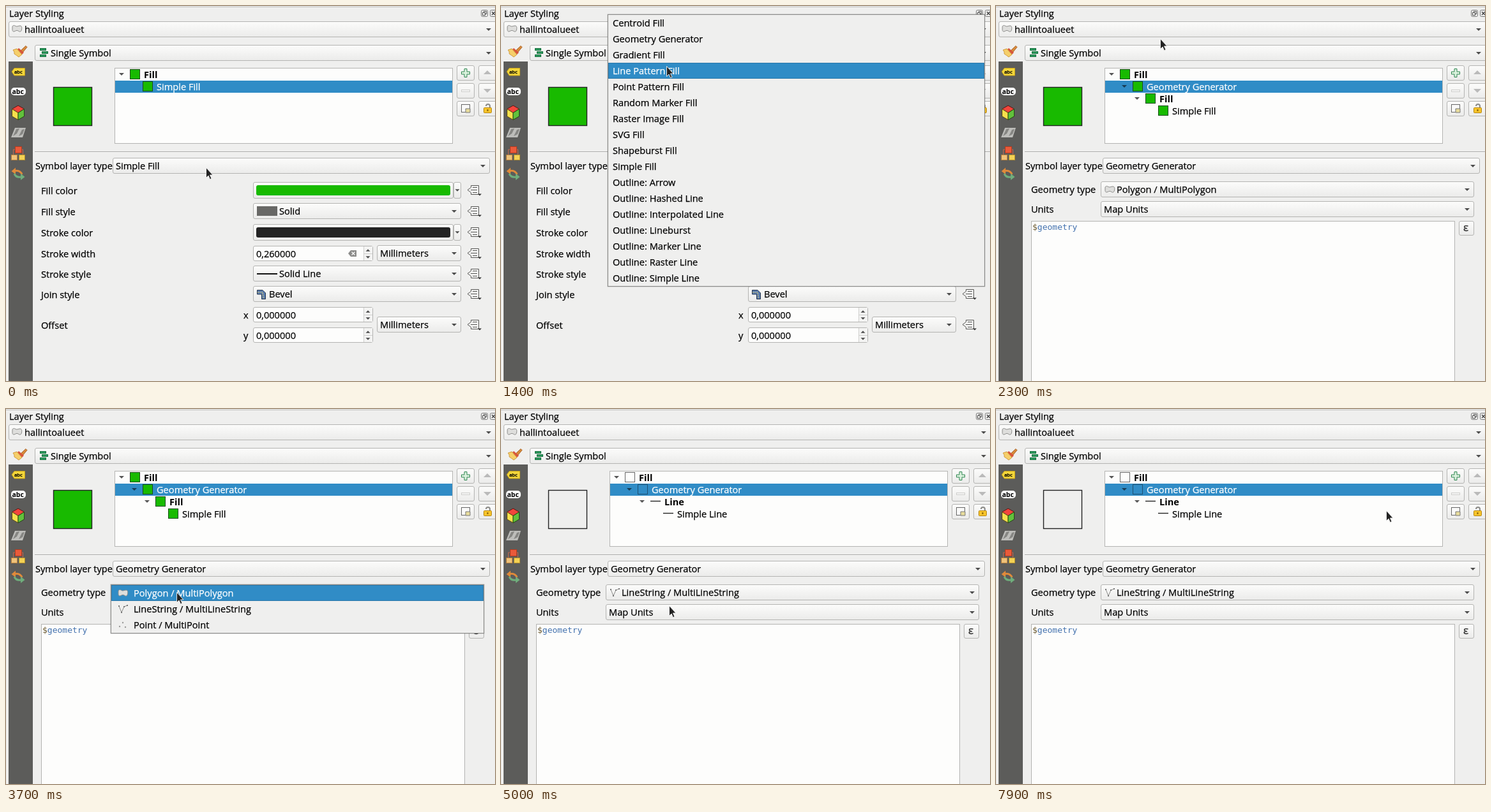
An HTML page that plays this animation: 766 px wide and 588 px high, repeating every 8 s.

```html
<!DOCTYPE html>
<html lang="en">
<head>
<meta charset="utf-8">
<title>Layer styling panel</title>
<style>
html, body { margin: 0; width: 100%; height: 100%; overflow: hidden; background: #efefee; }
svg { display: block; width: 100%; height: 100%; }
text { font: 14.6px "Open Sans", "Noto Sans", sans-serif; fill: #000; stroke: #000; stroke-width: .25px; }
.bold { font-weight: 700; stroke: none; }
.light { fill: #fff; stroke: #fff; }
.code { font: 13px "DejaVu Sans Mono", monospace; stroke: none; }
.tag { font-size: 7.5px; font-weight: 600; }
.label { font-size: 10.5px; font-weight: 700; stroke: none; }
.sign { font-size: 17px; fill: #333; }
</style>
</head>
<body>
<svg id="stage" viewBox="0 0 766 588" xmlns="http://www.w3.org/2000/svg"></svg>
<script>
const LOOP = 8000, STEP = 100;
const GREEN = '#18ba00', BLUE = '#308cc6', INK = '#232323', PAPER = '#fdfdfc', EDGE = '#b4b4b2';
const ROW = 25, TYPE_TOP = 14, GEOM_TOP = 276;

// Markup helpers
const group = (id, body) => `<g id="${id}">${body}</g>`;
const at = (x, y, body) => `<g transform="translate(${x} ${y})">${body}</g>`;
const text = (x, y, s, cls = '') => `<text x="${x}" y="${y}" class="${cls}">${s}</text>`;
const rect = (x, y, w, h, fill, stroke = 'none', r = 0, sw = 1) =>
  `<rect x="${x}" y="${y}" width="${w}" height="${h}" rx="${r}" fill="${fill}" stroke="${stroke}" stroke-width="${sw}"/>`;
const path = (d, fill = 'none', stroke = 'none', w = 1, dash = 'none') =>
  `<path d="${d}" fill="${fill}" stroke="${stroke}" stroke-width="${w}" stroke-dasharray="${dash}"/>`;
const box = (x1, y1, x2, y2, fill = 'url(#face)') =>
  rect(x1 + .5, y1 + .5, x2 - x1 - 1, y2 - y1 - 1, fill, EDGE, 2.5);
const down = (x, y, fill = '#4c4c4c', s = 4) => path(`M${x - s} ${y - s / 2}h${2 * s}l${-s} ${s}z`, fill);
const up = (x, y, fill = '#4c4c4c', s = 4) => path(`M${x - s} ${y + s / 2}h${2 * s}l${-s} ${-s}z`, fill);
const combo = (x1, y, x2, tx, label) =>
  box(x1, y, x2, y + 25) + down(Math.min(x2 - 11, 756), y + 13) + text(tx, y + 18, label);

const polygonIcon = (x, y) => at(x, y, path(
  'M1 3C1 0 4 0 6 1.5C8 3 10 1 13 1C16 1 16 4 15.5 7C15 10 13 11 11 9.5C9 8 7 8 5 9.5C2 11 1 9 1 7Z', '#dededc', '#8c8c8a'));
const lineIcon = (x, y) => at(x, y, path('M2 2L6 12L10 3L15 1', 'none', '#8a8a88') +
  [[2, 2], [6, 12], [10, 3], [15, 1]].map(([a, b]) => rect(a - 1, b - 1, 2, 2, '#777')).join(''));
const pointIcon = (x, y) => at(x, y,
  [[3, 10], [8, 4], [12, 11]].map(([a, b]) => `<circle cx="${a}" cy="${b}" r="1.2" fill="#9a9a98"/>`).join(''));

const override = y => at(722, y - 9,
  path('M6.500 1.500H18.500V15.500H6.500V12.500L1 8.500L6.500 4.500Z', '#f4f4f3', '#555553') +
  path('M9 4.500h7M6 8.500h10M9 12.500h7', 'none', '#555553') + down(20, 16, '#333', 3));

const colorRow = (y, fill) => box(387, y, 701, y + 26) + rect(392, y + 5, 304, 16, fill, 'none', 3) +
  box(701, y, 713, y + 26) + down(707, y + 13, '#4c4c4c', 3.5);
const spin = (y, value) => box(387, y, 575, y + 24, PAPER) + rect(560, y + 1, 14, 22, '#f4f4f3') +
  path(`M560.5 ${y + 1}v22M561 ${y + 12.5}h13`, 'none', '#cfcfcd') +
  up(567, y + 7, '#4c4c4c', 3.5) + down(567, y + 18, '#4c4c4c', 3.5) + text(392, y + 18, value);

function sideTabs() {
  const brush = path('M23 70L31 62.500L33 64.500L26 73Z', '#d98b3a', '#a8642a') +
    path('M20 66L28 73L25 76L17 69Z', '#d8553c') +
    path('M11 69L17 67L25 76L20 80Q16 77 13 75Q14 72 11 69Z', '#f6cf6a', '#cf9a3c');
  const labels = path('M9 103l4-5.500h16.500v11.500h-16.500z', '#f4d63a', '#c9a51c') + text(13, 106, 'abc', 'tag') +
    rect(8, 128, 23, 12, '#fafafa', 'none', 5) + text(9.5, 138, 'abc', 'label');
  const cube = path('M9.500 161.500L19 156L28.500 161.500L19 167.500Z', '#f2453c', '#5a1612') +
    path('M9.500 161.500L19 167.500V178.500L9.500 173Z', '#f8e04c', '#5a4e16') +
    path('M28.500 161.500L19 167.500V178.500L28.500 173Z', '#62c13c', '#234a14');
  const relief = path('M14 191H31L26 206H8Z', '#bdbdba') +
    path('M16 193L21 192L17 200L11 204ZM25 194L29 193L26 201L20 204Z', '#868683');
  const diagram = path('M11.500 233V225H26.500V233', 'none', '#c4674e') +
    rect(14.5, 220.5, 10, 10, '#ea5a3a', '#b33b20') +
    rect(8.5, 233.5, 9, 8, '#eec27a', '#b7813e') + rect(20.5, 233.5, 9, 8, '#f4d254', '#b08e2e');
  const history = path('M25 264Q22 257 14 258.500', 'none', '#e08a3a', 3) + path('M8.500 259L15 253.500V264Z', '#e08a3a') +
    path('M13 263Q16 269.500 23 268', 'none', '#6fae7c', 3) + path('M29.500 268L23 262.500V273Z', '#6fae7c');
  return rect(4, 87, 38, 510, '#5c5c5a') + brush + labels + cube + relief + diagram + history;
}

function toolButtons() {
  const faces = [93, 121, 149].map(y => box(706, y, 734, y + 24) + box(740, y, 775, y + 24)).join('');
  const plus = path('M718 98.500h4v4.500h4.500v4h-4.500v4.500h-4v-4.500h-4.500v-4h4.500z', '#d9f0dc', '#2f8650');
  const minus = rect(713.5, 131.5, 13, 3, '#f4f4f3', '#cfcfcd');
  const copy = rect(713.5, 154.5, 13, 12, '#fafaf9', '#666') + path('M720 167v-6h7v6z', '#e8dd9c', '#777');
  const lock = path('M758 160v-3a3 3 0 0 0 -6 0', 'none', '#8b8b88', 2) +
    rect(748.5, 159.5, 12, 8, '#f7c52b', '#b48310', 1) + rect(753.5, 162, 2, 3, '#8b6408');
  return faces + plus + minus + copy + lock + up(754, 104, '#bababa', 6) + down(754, 133, '#bababa', 6);
}

function frameWork() {
  const header = path('M0 1.5H766', 'none', '#c2c2c0') + text(5, 17, 'Layer Styling') +
    rect(744.5, 6.5, 10, 10, '#efefee', '#777', 2) + rect(748.5, 8.5, 4, 4, 'none', '#555') +
    rect(746.5, 10.5, 4, 4, '#efefee', '#555') +
    rect(758.5, 6.5, 10, 10, '#efefee', '#777', 2) + path('M761 9l5 5M766 9l-5 5', 'none', '#444', 1.5);
  const bars = [[53, 66], [56, 71], [53, 76]]
    .map(([x, y]) => rect(x + .5, y + .5, 9, 3, '#2f9c60', '#19703f')).join('');
  return header + combo(4, 24, 772, 29, 'hallintoalueet') + polygonIcon(9, 30) +
    sideTabs() + combo(45, 61, 772, 70, 'Single Symbol') + bars +
    rect(170.5, 97.5, 529, 118, PAPER, EDGE) + rect(171, 117, 528, 19, BLUE) + toolButtons() +
    path('M45 228.5H766', 'none', '#a9a9a7') + path('M45 229.5H766', 'none', '#fafafa') +
    text(46, 256, 'Symbol layer type');
}

const preview = fill => rect(74.5, 127.5, 60, 60, fill, INK, 0, 1.4);

// One line of the symbol tree; a dash stands for a line symbol.
function treeRow(level, label, { fill, dash, cls = '', leaf }) {
  const x = 194 + 20 * level, y = 99 + 19 * level;
  const icon = dash ? path(`M${x} ${y + 7.5}h16`, 'none', INK, 1.4)
    : rect(x + .5, y + .5, 15, 15, fill, fill === GREEN ? '#1a4a14' : level ? '#1f4f70' : '#666');
  return (leaf ? '' : down(x - 13, y + 8, level === 1 ? '#173c55' : '#555')) + icon + text(x + 22, y + 14, label, cls);
}

function tree(kind) {
  const dash = kind === 'Line', fill = dash ? 'none' : GREEN;
  return preview(fill) + treeRow(0, 'Fill', { fill, cls: 'bold' }) +
    treeRow(1, 'Geometry Generator', { fill, cls: 'light' }) +
    treeRow(2, kind, { fill, dash, cls: 'bold' }) +
    treeRow(3, 'Simple ' + kind, { fill, dash, leaf: true });
}

function simplePanel() {
  const names = { 'Fill color': 289, 'Fill style': 322, 'Stroke color': 355, 'Stroke width': 388,
    'Stroke style': 420, 'Join style': 452, 'Offset': 500 };
  const labels = Object.entries(names).map(([s, y]) => text(55, y + 6, s) + override(y)).join('');
  const join = path('M393.500 445.500H402L406.500 450V459.500H400.500V452H393.500Z', '#5a7cb0', '#26364d') +
    path('M394 449H402L403.500 459', 'none', '#e6d36a', 1, '2 1');
  const clear = path('M536 388l4-5h9v10h-9z', '#8b8b89') + path('M541.500 385.500l5 5m0-5l-5 5', 'none', '#fff', 1.3);
  return preview(GREEN) + treeRow(0, 'Fill', { fill: GREEN, cls: 'bold' }) +
    treeRow(1, 'Simple Fill', { fill: GREEN, cls: 'light', leaf: true }) +
    combo(167, 238, 758, 172, 'Simple Fill') + labels +
    colorRow(276, GREEN) + colorRow(342, INK) +
    combo(387, 309, 713, 428, 'Solid') + rect(393, 314, 32, 15, '#686866') +
    spin(376, '0,260000') + clear + combo(581, 375, 713, 586, 'Millimeters') +
    combo(387, 407, 713, 428, 'Solid Line') + path('M393 420H425', 'none', '#111', 2) +
    combo(387, 439, 713, 412, 'Bevel') + join +
    text(372, 490, 'x') + spin(472, '0,000000') + text(372, 522, 'y') + spin(504, '0,000000') +
    combo(581, 487, 713, 586, 'Millimeters');
}

const generatorPanel = () => combo(167, 238, 758, 172, 'Geometry Generator') +
  text(55, 293, 'Geometry type') + text(55, 324, 'Units') +
  combo(164, 306, 749, 169, 'Map Units') +
  rect(55.5, 337.5, 663, 270, PAPER, EDGE) +
  text(57, 351, '<tspan fill="#6b5a30">$</tspan><tspan fill="#4271ae">geometry</tspan>', 'code') +
  box(725, 337, 749, 360) + text(732, 353, 'ε', 'sign');

const geometryCombo = (label, icon) => combo(164, 275, 749, 189, label) + icon;

function popup(id, x1, x2, top, tx, items) {
  const h = items.length * ROW;
  return group(id, rect(x1 - .5, top - 1.5, x2 - x1 + 1, h + 3, 'none', '#00000020', 1) +
    rect(x1 + .5, top - .5, x2 - x1 - 1, h + 1, '#efefee', '#8e8e8c') +
    `<rect id="${id}Mark" x="${x1 + 1.5}" width="${x2 - x1 - 3}" height="${ROW - 1}" fill="${BLUE}" stroke="#2a78aa"/>` +
    items.map((s, i) => text(tx, top + i * ROW + 18, s)).join(''));
}

const types = ['Centroid Fill', 'Geometry Generator', 'Gradient Fill', 'Line Pattern Fill', 'Point Pattern Fill',
  'Random Marker Fill', 'Raster Image Fill', 'SVG Fill', 'Shapeburst Fill', 'Simple Fill',
  ...['Arrow', 'Hashed Line', 'Interpolated Line', 'Lineburst', 'Marker Line', 'Raster Line', 'Simple Line']
    .map(s => 'Outline: ' + s)];
const geometries = ['Polygon / MultiPolygon', 'LineString / MultiLineString', 'Point / MultiPoint'];

const stage = document.getElementById('stage');
stage.innerHTML = `<defs><linearGradient id="face" x2="0" y2="1">
    <stop stop-color="#fcfcfb"/><stop offset="1" stop-color="#ebebea"/></linearGradient></defs>` +
  rect(0, 0, 766, 588, '#efefee') + frameWork() +
  group('simple', simplePanel()) +
  group('generator', generatorPanel()) +
  group('polygon', tree('Fill') + geometryCombo(geometries[0], polygonIcon(170, 282))) +
  group('line', tree('Line') + geometryCombo(geometries[1], lineIcon(170, 281))) +
  popup('typeList', 167, 758, TYPE_TOP, 175, types) +
  popup('geomList', 164, 749, GEOM_TOP, 200, geometries) +
  group('geomIcons', polygonIcon(175, 283) + lineIcon(175, 307) + pointIcon(175, 331)) +
  group('cursor', path('M.5 .5V16.500L4 13L6.500 18.700L9 17.600L6.500 12H11Z', '#222', '#f4f4f4', .9));

const el = id => document.getElementById(id);
const show = (id, on) => el(id).setAttribute('visibility', on ? 'visible' : 'hidden');

const linear = k => k, easeOut = k => 1 - (1 - k) ** 2, smooth = k => k * k * (3 - 2 * k);
// Pointer moves: start, end, destination, easing
const moves = [
  [200, 600, 307, 246, linear],
  [1100, 1400, 259, 94, linear],
  [1400, 1900, 257, 51, easeOut],
  [2400, 3200, 267, 287, smooth],
  [4300, 4700, 263, 308, linear],
  [6000, 6100, 263, 306, linear],
  [6400, 6500, 264, 304, linear],
  [6600, 6800, 259, 303, linear],
  [7300, 7900, 611, 159, smooth]
];

function pointer(t) {
  let x = 313, y = 253;
  for (const [from, to, nx, ny, ease] of moves) {
    const k = ease(Math.min(1, Math.max(0, (t - from) / (to - from))));
    x += (nx - x) * k;
    y += (ny - y) * k;
  }
  return [Math.round(x), Math.round(y)];
}

function mark(id, top, y, count) {
  const row = Math.min(count - 1, Math.max(0, Math.floor((y - top) / ROW)));
  el(id + 'Mark').setAttribute('y', top + row * ROW + .5);
  el(id).querySelectorAll('text').forEach((n, i) => n.classList.toggle('light', i === row));
}

function draw(time) {
  const t = Math.floor(time / STEP) * STEP;
  const [x, y] = pointer(t);
  const within = (a, b) => t >= a && t < b;
  const geomOpen = within(3700, 4900);
  show('simple', t < 2300);
  show('generator', t >= 2300);
  show('polygon', within(2300, 5000));
  show('line', t >= 5000);
  show('typeList', within(400, 2200));
  show('geomList', geomOpen);
  show('geomIcons', geomOpen);
  mark('typeList', TYPE_TOP, y, types.length);
  mark('geomList', GEOM_TOP, y, geometries.length);
  el('cursor').setAttribute('transform', `translate(${x} ${y})`);
}

const start = performance.now();
function tick() {
  draw((performance.now() - start) % LOOP);
  requestAnimationFrame(tick);
}
tick();
</script>
</body>
</html>
```
